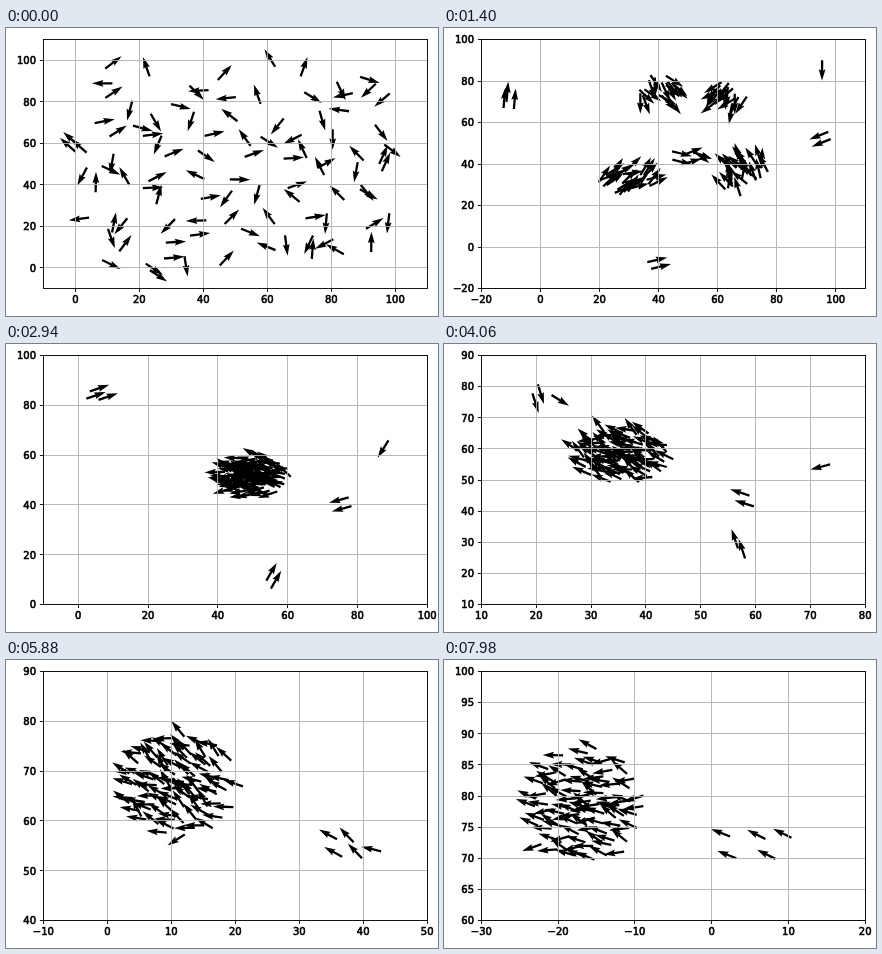
These frames come from a looping animation (432x288 px, 8 s). An HTML page:

```html
<!DOCTYPE html>
<html lang="en">
<head>
<meta charset="utf-8">
<title>Flocking arrows</title>
<style>
  html, body { margin: 0; width: 100%; height: 100%; overflow: hidden; background: #fff; }
  svg { display: block; width: 100vw; height: 100vh; }
  text { font: 10px "DejaVu Sans", sans-serif; stroke: #000; stroke-width: .6px; }
  .grid { stroke: #b0b0b0; stroke-width: .9; }
  .axis { stroke: #000; stroke-width: .9; fill: none; }
</style>
</head>
<body>
<svg viewBox="0 0 432 288">
  <g id="arrows"></g>
  <g id="axes"></g>
</svg>
<script>
const LOOP = 8000, STEP = 140, SPEED = 2.2;
const BOX = { left: 37.4, right: 421.2, top: 11.5, bottom: 260.5 };
const KEYS = [0, 10, 21, 29, 42, 51, 57];
const COLUMNS = 9, ROWS = 10, JOINERS = 3;
const FLOCK_SIZE = COLUMNS * ROWS + JOINERS;

// Blobs: centre, radii and mean heading in degrees
const blob = (x, y, rx, ry, heading) => ({ x, y, rx, ry, heading });
const CLUSTERS = [
  blob(39, 77, 6.5, 7, -60),
  blob(64, 74, 7, 6, -122),
  blob(28.5, 31, 8.5, 6, 35),
  blob(47, 45, 6.5, 6, -5),
  blob(70, 33, 8.5, 9, 110)
];
const FLOCK = [
  blob(51.5, 51.5, 9.5, 8, 168),
  blob(36.5, 57.5, 9, 8.8, 157),
  blob(11.5, 67, 9.3, 10.3, 150),
  blob(-4.5, 74.7, 9, 9.2, 157),
  blob(-16, 78.3, 7.8, 9.2, 170)
];

// Loners: the path of a leader and the offsets of all who follow it
const LONERS = [
  { path: [[0, 56], [-12.5, 67], [2.3, 82.7], [19.3, 77.8]],
    offsets: [[0, 0], [1, 2.9], [3.5, -.5]] },
  { path: [[89, 92], [95.4, 90], [88.9, 65.9], [73.6, 55], [42.8, 53.9], [25.2, 66.2], [10.4, 73.3]],
    offsets: [[0, 0]] },
  { path: [[95, 50], [97.5, 55.5], [77.5, 43], [58.9, 45], [35.9, 56.3], [18.3, 67.3], [2.4, 73.5]],
    offsets: [[0, 0], [.8, -3.5]] },
  { path: [[22, 2], [36.2, -7.3], [53.9, 9.6], [56.8, 28], [38.5, 55.7], [20.2, 66.5], [7, 73.1]],
    offsets: [[0, 0], [1.3, -3.2]] }
];

let seed = 20;
function random() {
  seed = (seed + 0x6d2b79f5) | 0;
  let r = Math.imul(seed ^ (seed >>> 15), 1 | seed);
  r = (r + Math.imul(r ^ (r >>> 7), 61 | r)) ^ r;
  return ((r ^ (r >>> 14)) >>> 0) / 4294967296;
}
const spread = size => (random() * 2 - 1) * size;
const polar = (r, a) => ({ x: r * Math.cos(a), y: r * Math.sin(a) });

// A knot is a position with the velocity the arrow has there
function knot(x, y, angle) {
  const v = polar(SPEED, angle);
  return { x, y, vx: v.x, vy: v.y };
}
const inBlob = (b, place) => knot(
  b.x + b.rx * (place.x + spread(.07)),
  b.y + b.ry * (place.y + spread(.07)),
  (b.heading + spread(33)) * Math.PI / 180);

// Sunflower order fills the flock, denser towards its centre
function flockKnots(index) {
  const place = polar(((index + .5) / FLOCK_SIZE) ** .62, index * 2.4);
  return FLOCK.map(b => inBlob(b, place));
}

function member(x, y, index) {
  const distance = c => Math.hypot(c.x - x, c.y - y) / c.rx;
  const nearest = CLUSTERS.reduce((a, b) => distance(b) < distance(a) ? b : a);
  const place = polar(Math.sqrt(random()), spread(Math.PI));
  return [knot(x, y, spread(Math.PI)), inBlob(nearest, place), ...flockKnots(index)];
}

// Short paths end by joining the flock; headings follow the neighbouring points
function loner(path, [dx, dy], index) {
  const points = path.map(([x, y]) => ({ x: x + dx, y: y + dy }))
    .concat(flockKnots(index).slice(path.length - 2));
  return points.map((p, k) => {
    const before = points[k - 1] || p, after = points[k + 1] || p;
    return knot(p.x, p.y, Math.atan2(after.y - before.y, after.x - before.x));
  });
}

const birds = [];
for (let column = 0; column < COLUMNS; column++) {
  for (let row = 0; row < ROWS; row++) {
    const x = (column + random()) * 100 / COLUMNS, y = (row + random()) * 97 / ROWS;
    birds.push(member(x, y, birds.length));
  }
}
for (const { path, offsets } of LONERS) {
  for (const offset of offsets) birds.push(loner(path, offset, birds.length));
}

function hermite(p, v, q, w, span, u) {
  const m = v * span, n = w * span, d = q - p;
  return {
    at: p + u * (m + u * (3 * d - 2 * m - n + u * (m + n - 2 * d))),
    slope: m + u * (2 * (3 * d - 2 * m - n) + 3 * u * (m + n - 2 * d))
  };
}

function pose(knots, step) {
  let k = 0;
  while (k < KEYS.length - 2 && step >= KEYS[k + 1]) k++;
  const span = KEYS[k + 1] - KEYS[k], u = (step - KEYS[k]) / span;
  const a = knots[k], b = knots[k + 1];
  const x = hermite(a.x, a.vx, b.x, b.vx, span, u);
  const y = hermite(a.y, a.vy, b.y, b.vy, span, u);
  return { x: x.at, y: y.at, angle: Math.atan2(y.slope, x.slope) * 180 / Math.PI };
}

// The view reaches ten units beyond the rounded extremes
function limits(values) {
  const low = Math.round(Math.min(...values) / 10) * 10 - 10;
  const high = Math.round(Math.max(...values) / 10) * 10 + 10;
  const range = high - low, gap = range > 90 ? 20 : range > 40 ? 10 : 5;
  const ticks = [];
  for (let t = Math.ceil(low / gap) * gap; t <= high; t += gap) ticks.push(t);
  return { low, range, ticks };
}

const line = (cls, x1, y1, x2, y2) =>
  `<line class="${cls}" x1="${x1}" y1="${y1}" x2="${x2}" y2="${y2}"/>`;
const label = (value, x, y, anchor) =>
  `<text x="${x}" y="${y}" text-anchor="${anchor}">${String(value).replace("-", "\u2212")}</text>`;
const crisp = v => Math.floor(v) + .5;
const ARROW = "M0-1.15H10.2L9-3.4L20.5 0L9 3.4L10.2 1.15H0Z";

function draw(step) {
  const { left, right, top, bottom } = BOX;
  const poses = birds.map(b => pose(b, step));
  const xs = limits(poses.map(p => p.x)), ys = limits(poses.map(p => p.y));
  const toX = x => left + (x - xs.low) / xs.range * (right - left);
  const toY = y => bottom - (y - ys.low) / ys.range * (bottom - top);

  document.getElementById("arrows").innerHTML = poses.map(p =>
    `<path d="${ARROW}" transform="translate(${toX(p.x)} ${toY(p.y)}) rotate(${-p.angle})"/>`).join("");

  let grid = "", marks = "";
  for (const t of xs.ticks) {
    const x = crisp(toX(t));
    grid += line("grid", x, top, x, bottom);
    marks += line("axis", x, bottom, x, bottom + 3.5) + label(t, toX(t), 275, "middle");
  }
  for (const t of ys.ticks) {
    const y = crisp(toY(t));
    grid += line("grid", left, y, right, y);
    marks += line("axis", left - 3.5, y, left, y) + label(t, 30, toY(t) + 3.8, "end");
  }
  document.getElementById("axes").innerHTML = grid + marks +
    `<rect class="axis" x="${crisp(left)}" y="${top}" width="${crisp(right) - crisp(left)}" height="${bottom - top}"/>`;
}

let shown = -1;
const begin = performance.now();
function tick() {
  const step = Math.floor((performance.now() - begin) % LOOP / STEP);
  if (step !== shown) draw(shown = step);
  requestAnimationFrame(tick);
}
tick();
</script>
</body>
</html>
```
